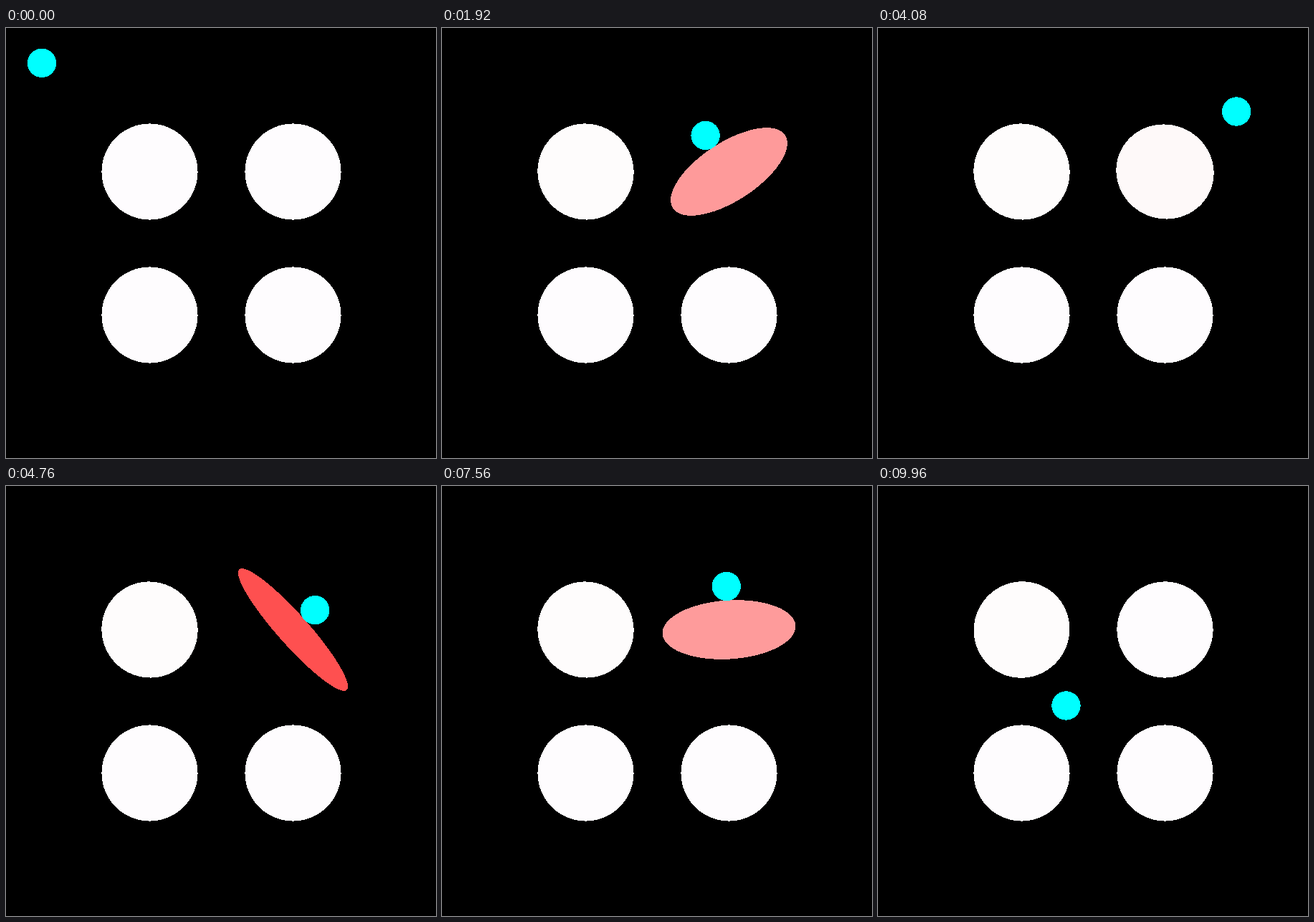
An HTML page for the animation above (10 s loop, 600 by 600 pixels).

```html
<!DOCTYPE html>
<html lang="en">
<head>
<meta charset="utf-8">
<title>Soft bumpers</title>
<style>
  html, body { margin: 0; width: 100%; height: 100%; overflow: hidden; background: #000; }
  svg { display: block; width: 100%; height: 100%; }
</style>
</head>
<body>
<!-- Whole coordinates fall on pixel centres -->
<svg id="stage" viewBox="-0.5 -0.5 600 600" shape-rendering="crispEdges"></svg>
<script>
const LOOP = 10000, STEP = 40;
const R = 66.67, BALL = 20, REACH = R + BALL;
const EDGE = 0.4; // drawn outlines round outwards
const CENTERS = [[200, 200], [400, 200], [200, 400], [400, 400]];

// Path corners; "hit" marks a leg spent pressing into a disc.
// depth: deepest dent, rest: dent left behind afterwards.
const knot = (t, x, y, hit) => ({ t, x, y, hit });
const hit = (disc, depth, rest) => ({ disc, depth, rest });
const path = [
  knot(0, 49.5, 48.3),
  knot(865, 187.5, 114.1, hit(0, 12.5, 0.4)),
  knot(1291, 258.7, 136.2),
  knot(1705, 332, 146.4, hit(1, 32, 1.4)),
  knot(2378, 431, 119),
  knot(3240, 546.9, 20),
  knot(3486, 580, 48.3),
  knot(4327, 466.3, 144.2, hit(1, 47.4, 0)),
  knot(5070, 463.8, 141.3),
  knot(5973, 580, 31.8),
  knot(6071, 567.4, 20),
  knot(6980, 450.6, 130, hit(1, 44.5, 0)),
  knot(7715, 386.9, 114.3),
  knot(8286, 351, 20),
  knot(9317, 286.1, 190.3, hit(0, 6, 0.5)),
  knot(9644, 270.3, 250.7),
  knot(LOOP, 260.9, 313)
];

const stage = document.getElementById("stage");
function add(tag, attrs) {
  const el = document.createElementNS("http://www.w3.org/2000/svg", tag);
  for (const k in attrs) el.setAttribute(k, attrs[k]);
  return stage.appendChild(el);
}
const discs = CENTERS.map(([cx, cy]) => add("ellipse", { cx, cy }));
const ball = add("circle", { r: BALL + EDGE / 2, fill: "#0ff" });

const mix = (a, b, k) => a + (b - a) * k;
// Angle of a point around a disc, clockwise from straight up
const angleAt = (p, [cx, cy]) => Math.atan2(p.x - cx, cy - p.y);
const press = s => (Math.sin(Math.PI * s) - 0.02 * Math.sin(3 * Math.PI * s)) / 1.02;

// The ball swings faster around the disc the closer it gets to the centre.
function swing(s, depth) {
  const q = ((REACH - depth) / REACH) ** 2;
  const g = (1 - q) / (1 + q);
  return s - g * Math.sin(2 * Math.PI * s) / (2 * Math.PI);
}

function drawDisc(i, { dent, angle }) {
  const el = discs[i], [cx, cy] = CENTERS[i];
  const tone = Math.round(254 * (R - dent) / R);
  el.setAttribute("rx", R + dent + EDGE);
  el.setAttribute("ry", R - dent + EDGE);
  el.setAttribute("transform", `rotate(${angle * 180 / Math.PI} ${cx} ${cy})`);
  el.setAttribute("fill", `rgb(254,${Math.min(tone, 252)},${tone})`);
}

function draw(t) {
  const shapes = CENTERS.map(() => ({ dent: 0, angle: 0 }));
  let x = 0, y = 0;
  for (let i = 0; i < path.length - 1 && path[i].t <= t; i++) {
    const a = path[i], b = path[i + 1];
    const s = Math.min(1, (t - a.t) / (b.t - a.t));
    if (!a.hit) {
      x = mix(a.x, b.x, s);
      y = mix(a.y, b.y, s);
      continue;
    }
    const { disc, depth, rest } = a.hit, c = CENTERS[disc];
    const angle = mix(angleAt(a, c), angleAt(b, c), swing(s, depth));
    const d = depth * press(s);
    x = c[0] + (REACH - d) * Math.sin(angle);
    y = c[1] - (REACH - d) * Math.cos(angle);
    shapes[disc] = { dent: s > 0.5 ? Math.max(d, rest) : Math.max(d, 0), angle };
  }
  shapes.forEach((shape, i) => drawDisc(i, shape));
  ball.setAttribute("cx", x);
  ball.setAttribute("cy", y);
}

const start = performance.now();
function tick(now) {
  const t = Math.max(0, now - start) % LOOP;
  draw(Math.floor(t / STEP) * STEP);
  requestAnimationFrame(tick);
}
draw(0);
requestAnimationFrame(tick);
</script>
</body>
</html>
```
